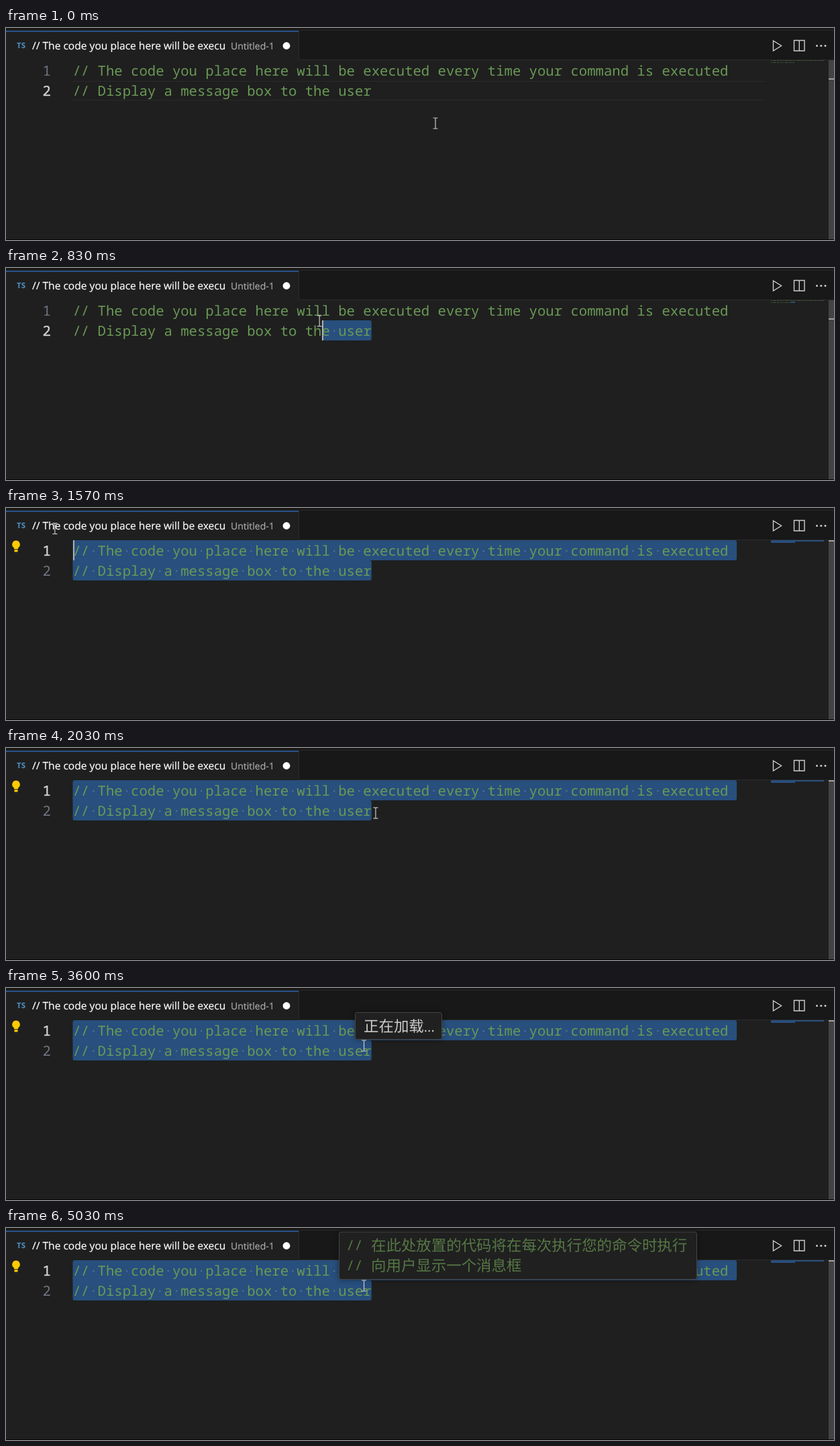
These frames come from a looping animation (1234 by 316 pixels, 5060 ms). An HTML page:

```html
<!DOCTYPE html>
<html lang="en">
<head>
<meta charset="utf-8">
<title>Editor selection and hover translation</title>
<style>
  html, body { margin: 0; width: 100%; height: 100%; overflow: hidden; background: #1f1f1f; }
  svg { display: block; }
  text { text-rendering: geometricPrecision; white-space: pre; }
  .code { font: 20.62px "Noto Sans Mono", monospace; fill: #6a9955; }
  .num { fill: #6e7681; }
  .num.active { fill: #d4d4d4; stroke: #d4d4d4; stroke-width: .4; }
  .ui { font: 15.58px "Open Sans", sans-serif; fill: #fff; stroke: #fff; stroke-width: .2; }
  .ui.type { font-size: 11.5px; font-weight: 700; fill: #4f91c4; stroke: none; }
  .ui.file { font-size: 14.05px; fill: #aaa; stroke: #aaa; }
  .cjk { font: 22.45px "Noto Sans CJK SC", "Noto Sans CJK", sans-serif; }
  .crisp { shape-rendering: crispEdges; }
  .icon { fill: none; stroke: #ccc; stroke-width: 1.4; }
  .sel { fill: #284f7d; }
  .popup { filter: drop-shadow(0 0 4px rgba(0, 0, 0, .4)); }
  .popup rect { fill: #202020; stroke: #454545; }
  #result text { fill: #557844; }
  #loading text { fill: #ccc; }
</style>
</head>
<body>
<svg width="1234" height="316" viewBox="0 0 1234 316">
  <rect width="1234" height="316" fill="#1f1f1f"/>

  <g class="crisp">
    <rect width="1234" height="48" fill="#181818"/>
    <rect y="3" width="1234" height="1" fill="#2b2b2b"/>
    <rect x="436" y="47" width="798" height="1" fill="#2b2b2b"/>
    <rect y="4" width="436" height="44" fill="#1f1f1f"/>
    <rect x="436" y="4" width="1" height="43" fill="#2b2b2b"/>
    <rect y="4" width="436" height="2" fill="#274f88"/>
  </g>
  <text class="ui type" x="16" y="30">TS</text>
  <text class="ui" x="39" y="32">// The code you place here will be execu</text>
  <text class="ui file" x="335" y="32">Untitled-1</text>
  <circle cx="418" cy="26.5" r="5.4" fill="#fff"/>
  <path class="icon" d="M1143.5 19V34L1155.5 26.5ZM1174.5 18.5H1190V34H1174.5ZM1182.3 18.5V34"/>
  <g fill="#ccc"><circle cx="1208.5" cy="26.5" r="1.5"/><circle cx="1214.8" cy="26.5" r="1.5"/><circle cx="1221" cy="26.5" r="1.5"/></g>

  <path id="lineBox" class="crisp" d="M99 79.5H1132M99 107.5H1132" stroke="#2a2a2a"/>
  <g class="sel">
    <rect id="sel1" y="48" height="30" rx="3"/>
    <rect id="sel2" y="78" height="30" rx="3"/>
    <rect id="join" x="99.5" y="74" width="5" height="8"/>
  </g>
  <g id="dots" fill="#4f7196"></g>
  <text id="num1" class="code num" x="54.6" y="70.5">1</text>
  <text id="num2" class="code num" x="54.6" y="100.5">2</text>
  <text id="line1" class="code" x="99.5" y="70.5"></text>
  <text id="line2" class="code" x="99.5" y="100.5"></text>
  <rect id="caret" class="crisp" width="2" height="30" fill="#aeafad"/>

  <g id="bulb" fill="#ffcc00">
    <path d="M15 48.5a5.8 5.8 0 0 1 3.4 10.5l-.6 2.2h-5.6l-.6-2.2A5.8 5.8 0 0 1 15 48.5Z"/>
    <rect x="12.4" y="62.2" width="5.2" height="3.4" rx="1"/>
  </g>

  <g class="crisp">
    <path d="M1140 48.5H1219M1140 51H1176" stroke="#6a9955" stroke-opacity=".4" stroke-dasharray="2 1 5 1 4 1 3 1"/>
    <rect id="map1" class="sel" y="48" height="2"/>
    <rect id="map2" class="sel" y="50" height="2"/>
    <rect x="1226" y="48" width="8" height="267" fill="#434343"/>
    <rect id="mark" x="1226" width="8" height="2" fill="#a0a0a0"/>
    <rect y="315" width="1234" height="1" fill="#050505"/>
  </g>

  <g id="loading" class="popup">
    <rect x="520.5" y="36.5" width="129" height="40" rx="3"/>
    <text class="cjk" x="533" y="65">正在加载<tspan font-family="Open Sans, sans-serif" font-size="20">...</tspan></text>
  </g>
  <g id="result" class="popup">
    <rect x="496.5" y="6" width="533" height="70.5" rx="3"/>
    <text class="code" x="507" y="33">//</text>
    <text class="cjk" x="544" y="33.5">在此处放置的代码将在每次执行您的命令时执行</text>
    <text class="code" x="507" y="63">//</text>
    <text class="cjk" x="544" y="63.5">向用户显示一个消息框</text>
  </g>

  <path id="mouse" d="M-3.5 -8H-1Q0 -8 0 -7Q0 -8 1 -8H3.5M0 -7V7M-3.5 8H-1Q0 8 0 7Q0 8 1 8H3.5" fill="none" stroke="#c8c8c8" stroke-width="1.2"/>
</svg>

<script>
const LOOP = 5060, LEFT = 99.5, CHAR = 12.37, TOP = 48, ROW = 30, MAP = 1140;
const lines = [
  '// The code you place here will be executed every time your command is executed',
  '// Display a message box to the user'
];
const anchor = lines[1].length;
const DRAG_END = 1300;

// Pointer path: time, x, y
const path = [
  [0, 640, 142], [30, 640, 142], [250, 590, 122], [480, 548, 99], [600, 546, 96],
  [830, 468, 79], [960, 366, 61], [1100, 253, 41], [1300, 100, 21], [1450, 75, 25],
  [1620, 72, 33], [1720, 380, 190], [1820, 700, 298], [1850, 715, 304],
  [1940, 630, 195], [2030, 551, 97], [2160, 540, 91.5], [2280, 533.5, 86], [LOOP, 533.5, 86]
];

const el = {};
document.querySelectorAll('[id]').forEach(n => el[n.id] = n);
const set = (n, attrs) => { for (const k in attrs) n.setAttribute(k, attrs[k]); };
const show = (n, on) => n.setAttribute('opacity', +on);
const colX = c => LEFT + c * CHAR;
const clamp = (v, a, b) => Math.min(b, Math.max(a, v));

const spaces = [];
lines.forEach((text, row) => {
  el['line' + (row + 1)].textContent = text;
  [...text].forEach((ch, col) => {
    if (ch !== ' ') return;
    const dot = document.createElementNS('http://www.w3.org/2000/svg', 'circle');
    set(dot, { cx: colX(col + .5), cy: TOP + row * ROW + 16, r: 1.3 });
    el.dots.append(dot);
    spaces.push({ dot, row, col });
  });
});

function pointer(t) {
  const i = Math.max(1, path.findIndex(p => p[0] > t));
  const [t0, x0, y0] = path[i - 1], [t1, x1, y1] = path[i];
  const k = (t - t0) / (t1 - t0);
  return [x0 + (x1 - x0) * k, y0 + (y1 - y0) * k];
}

function caretAt(t) {
  if (t < 600) return [1, anchor];
  const [x, y] = pointer(Math.min(t, DRAG_END));
  if (y < TOP) return [0, 0];
  const row = y < TOP + ROW ? 0 : 1;
  return [row, clamp(Math.round((x - LEFT) / CHAR), 0, lines[row].length)];
}

function caretOn(t) {
  if (t < 1600) return t >= 250;
  return (t - 1600) % 1000 > 505;
}

function span(n, from, to, unit, start) {
  set(n, { x: start + from * unit, width: Math.max(0, to - from) * unit });
}

function draw(t) {
  const [row, col] = caretAt(t);
  const ranges = row
    ? [[0, 0], [Math.min(col, anchor), anchor]]
    : [[col, lines[0].length + 1], [0, anchor]];

  ranges.forEach(([a, b], i) => {
    span(el['sel' + (i + 1)], a, b, CHAR, LEFT);
    span(el['map' + (i + 1)], a, Math.min(b, lines[i].length), 1, MAP);
    el['num' + (i + 1)].classList.toggle('active', i === row);
  });
  show(el.join, !row && !col);
  show(el.lineBox, row && col === anchor);
  for (const s of spaces) show(s.dot, s.col >= ranges[s.row][0] && s.col < ranges[s.row][1]);

  set(el.caret, { x: Math.round(colX(col)), y: TOP + row * ROW });
  show(el.caret, caretOn(t));
  set(el.mark, { y: row ? 75 : 48 });
  show(el.bulb, t >= 1500);

  el.loading.setAttribute('opacity', t < 3970 ? clamp((t - 3070) / 110, 0, 1) : 0);
  show(el.result, t >= 3970);

  const [x, y] = pointer(t);
  set(el.mouse, { transform: `translate(${x} ${y})` });
}

const begin = performance.now();
function tick() {
  draw((performance.now() - begin) % LOOP);
  requestAnimationFrame(tick);
}
tick();
</script>
</body>
</html>
```
